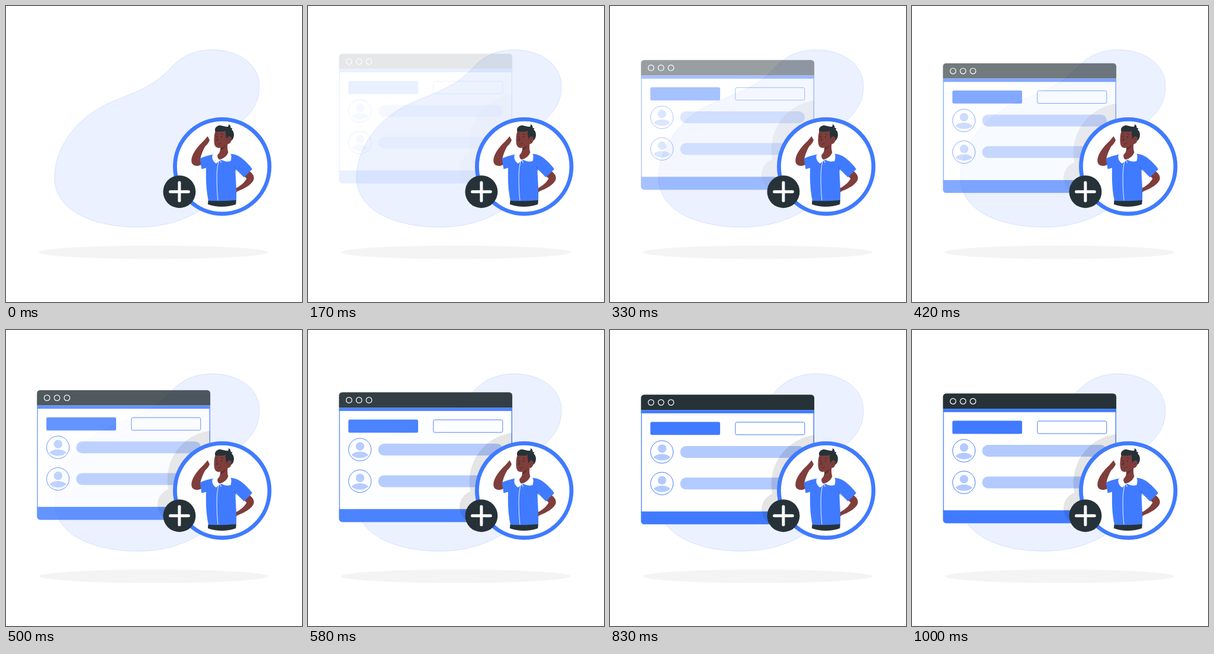
An HTML page with a canvas for the animation above (1.04 s loop, 500 px wide and 500 px high).

```html
<!DOCTYPE html>
<html lang="en">
<head>
<meta charset="utf-8">
<title>Add a contact</title>
<style>
html, body { margin: 0; width: 100%; height: 100%; overflow: hidden; background: #fff; }
canvas { display: block; width: 500px; height: 500px; }
</style>
</head>
<body>
<canvas id="stage" width="500" height="500"></canvas>
<script>
const BLUE = '#407bff', PALE = '#b3caff', DARK = '#263238', SKIN = '#7f3e3b', SHADE = '#63302e';
const LOOP = 1040, TICK = 1000 / 24, DROP = 30;

const stage = document.getElementById('stage').getContext('2d');
const layer = document.createElement('canvas');
layer.width = layer.height = 500;
const panel = layer.getContext('2d');

function paint(c, path, fill, stroke, width = 1) {
  if (fill) { c.fillStyle = fill; c.fill(path); }
  if (stroke) { c.strokeStyle = stroke; c.lineWidth = width; c.stroke(path); }
}
function disc(x, y, rx, ry = rx) {
  const p = new Path2D();
  p.ellipse(x, y, rx, ry, 0, 0, Math.PI * 2);
  return p;
}
function box(x, y, w, h, r = 0) {
  const p = new Path2D();
  p.roundRect(x, y, w, h, r);
  return p;
}
const shape = d => new Path2D(d);

// Motion: a drop with a soft overshoot
const pacing = [[0, 0], [250, .2625], [330, .365], [670, .705], [830, .85], [1000, 1]];
function pace(ms) {
  for (let i = 1; i < pacing.length; i++) {
    const [t0, a] = pacing[i - 1], [t1, b] = pacing[i];
    if (ms <= t1) return a + (b - a) * (ms - t0) / (t1 - t0);
  }
  return 1;
}
const curve = (a, b, s) => 3 * a * s * (1 - s) ** 2 + 3 * b * s * s * (1 - s) + s ** 3;
function ease(x) {
  let lo = 0, hi = 1;
  for (let i = 0; i < 30; i++) {
    const mid = (lo + hi) / 2;
    if (curve(.36, .5, mid) < x) lo = mid; else hi = mid;
  }
  return curve(-.01, 1.38, (lo + hi) / 2);
}

const blob = shape('M82 290C82 240 118 190 170 166C210 147 245 141 280 103C298 83 322 74 348 74' +
  'C392 74 428 98 428 135C428 165 414 180 398 195L365 270L328 345C298 364 262 373.5 222 373.5' +
  'C150 373.5 82 347 82 290Z');

function drawBackdrop(c) {
  c.fillStyle = '#fff';
  c.fillRect(0, 0, 500, 500);
  paint(c, blob, '#ebf1ff', '#b5ccfa', .5);
  paint(c, disc(249.5, 416, 194, 11.3), '#f4f4f4');
}

function drawRow(c, y) {
  paint(c, disc(87.7, y, 19.1), '#fff', BLUE);
  paint(c, disc(87.9, y - 5.5, 7.2), PALE);
  paint(c, shape(`M73.4 ${y + 9}C80 ${y + 1.8} 95.5 ${y + 1.8} 102 ${y + 9}` +
    `C95 ${y + 16.2} 80.5 ${y + 16.2} 73.4 ${y + 9}Z`), PALE);
  paint(c, box(118.5, y - 10, 210.6, 20, 10), PALE);
}

function drawWindow(c) {
  const frame = box(52.3, 107.2, 292.8, 219.2, 5.5);
  c.save();
  c.clip(frame);
  paint(c, box(52, 107, 294, 220), '#fff');
  paint(c, box(52, 107, 294, 26.2), DARK);
  paint(c, box(52, 133.2, 294, 5.6), BLUE);
  paint(c, box(52, 304.5, 294, 23), BLUE);
  paint(c, box(52.3, 138, 1.5, 168), BLUE);
  paint(c, box(343.6, 138, 1.5, 168), BLUE);
  for (const x of [69.3, 86.2, 103]) paint(c, disc(x, 120.4, 4.8), null, '#fff', 1.2);
  paint(c, box(68.2, 153.3, 117.8, 22.1, 2.5), BLUE);
  paint(c, box(211.8, 153.8, 117, 21.2, 2.5), '#fff', BLUE);
  drawRow(c, 204);
  drawRow(c, 257.4);
  const shadow = disc(356, 258.2, 83.4);
  shadow.addPath(disc(283.7, 301, 27.8));
  paint(c, shadow, 'rgba(0,0,0,.1)');
  c.restore();
}

const line = (c, d, color, width) => paint(c, shape(d), null, color, width);

function drawPerson(c) {
  // raised arm
  paint(c, shape('M340.6 220L344 226.5C342.5 231 340 234 336.5 237C333 243 330 250 328.5 257L330 268' +
    'C325 271 317 271 314.3 266C311 259 316 248 323 239.5C328 233 333 229 335 226.5Z'), SKIN);
  // resting arm
  paint(c, shape('M410 278C416 282 420 287 418.5 293C416 301 404 308 391 313L387 317L378.5 319.5L376.5 314' +
    'L380.5 309L390 307C397 303 403 298 406.5 291.5L401 286Z'), SKIN);
  paint(c, shape('M341.5 328L389 327.5L388.3 335C374 340 356 340.5 341 335Z'), DARK);
  // shirt
  paint(c, shape('M327.5 257.5C335 254 343 252 351 250.5L379 249.5C387 250.5 394 253 400 258.5' +
    'C406 263.5 411.5 269 416 275.5L402 289.5L387.5 275C387.8 292 390 312 389 328' +
    'C373 329.5 357 329.5 342 329C338 311 337.5 292 338 273.5L330.5 275.5Z'), BLUE);
  line(c, 'M385.5 271.5L388.5 278', '#2b5fd0', 1);
  // collar and neck
  paint(c, shape('M352 249.5L360 248L376 245.5C380 248 382 253 379.5 262C373 263.5 368 262.5 363 259.5' +
    'L355 266C350 263 347 257 349 251.5Z'), '#fff');
  paint(c, shape('M362 235L375 230C373.5 237 374 243 375.5 247C373 254 367 258 360.5 259.5' +
    'C357 257 356.5 253 358 250.5C361.5 248 362.5 243 362 235Z'), SKIN);
  paint(c, shape('M362.5 239.5C367 238.5 370 236 372 233C370.5 239 366 243 362.3 243.5Z'), SHADE);
  line(c, 'M360.3 260C356.7 268 355.8 282 356.2 298C356.4 310 357 320 358 328.5', '#fff', .9);
  line(c, 'M361.5 260L363.5 265', '#fff', 1);
  // head
  paint(c, shape('M354.5 209C351.5 216 350.8 226 352 233C353.5 239.5 358 240.8 363.5 239' +
    'C369 237 372.5 234 374 231L375 212Z'), SKIN);
  paint(c, shape('M353.5 212C351.5 206 356 202.5 361 201.5C366 202.3 370 203.8 374.5 204' +
    'C376 203 376.3 201.5 375.8 199.5C379 201.5 380 203.5 379.5 206L382.5 206.2L381.2 208.7' +
    'C385.5 212 386.3 220 383 225C381 228 377.5 229 375 229.5C372 226 371 219 371 211.5' +
    'C365 212.5 358.5 212.5 353.5 212Z'), DARK);
  paint(c, shape('M373 224C375 219.5 380 219 380.8 223.5C381.5 229 377.5 234 373.5 233Z'), SKIN);
  line(c, 'M375.8 229C376 225.5 377.5 224 379 223.5', SHADE, .7);
  // face
  paint(c, disc(363.8, 221.2, .8, 1.2), DARK);
  paint(c, disc(355.6, 220.2, .8, 1.2), DARK);
  line(c, 'M363 216.5C364.5 216 366.2 216.8 367 218', DARK, .9);
  line(c, 'M354 216.7C355 215.6 356.4 215.5 357.5 216', DARK, .9);
  paint(c, shape('M358.2 220.5L354.3 227.2C355.5 228.3 357 228.2 358.2 227.5Z'), SHADE);
  line(c, 'M357.8 233.2C360 233.5 362 232.5 363 231', DARK, .7);
}

function drawBadge(c) {
  paint(c, disc(365.2, 271.2, 79.8), '#fff', BLUE, 6.8);
  drawPerson(c);
  paint(c, disc(292.9, 313.7, 27.5), DARK);
  c.lineCap = 'round';
  line(c, 'M277.5 313.7H308.3M292.9 298.3V329.1', '#fff', 5);
  c.lineCap = 'butt';
}

function render(ms) {
  const step = Math.min(24, Math.floor((ms + 4.9) / TICK));
  const p = ease(pace(step * TICK));
  drawBackdrop(stage);
  if (step > 1) {
    panel.clearRect(0, 0, 500, 500);
    panel.save();
    panel.translate(0, (p - 1) * DROP);
    drawWindow(panel);
    panel.restore();
    stage.globalAlpha = Math.max(0, Math.min(1, p));
    stage.drawImage(layer, 0, 0);
    stage.globalAlpha = 1;
  }
  drawBadge(stage);
}

const start = performance.now();
function tick() {
  render((performance.now() - start) % LOOP);
  requestAnimationFrame(tick);
}
tick();
</script>
</body>
</html>
```
